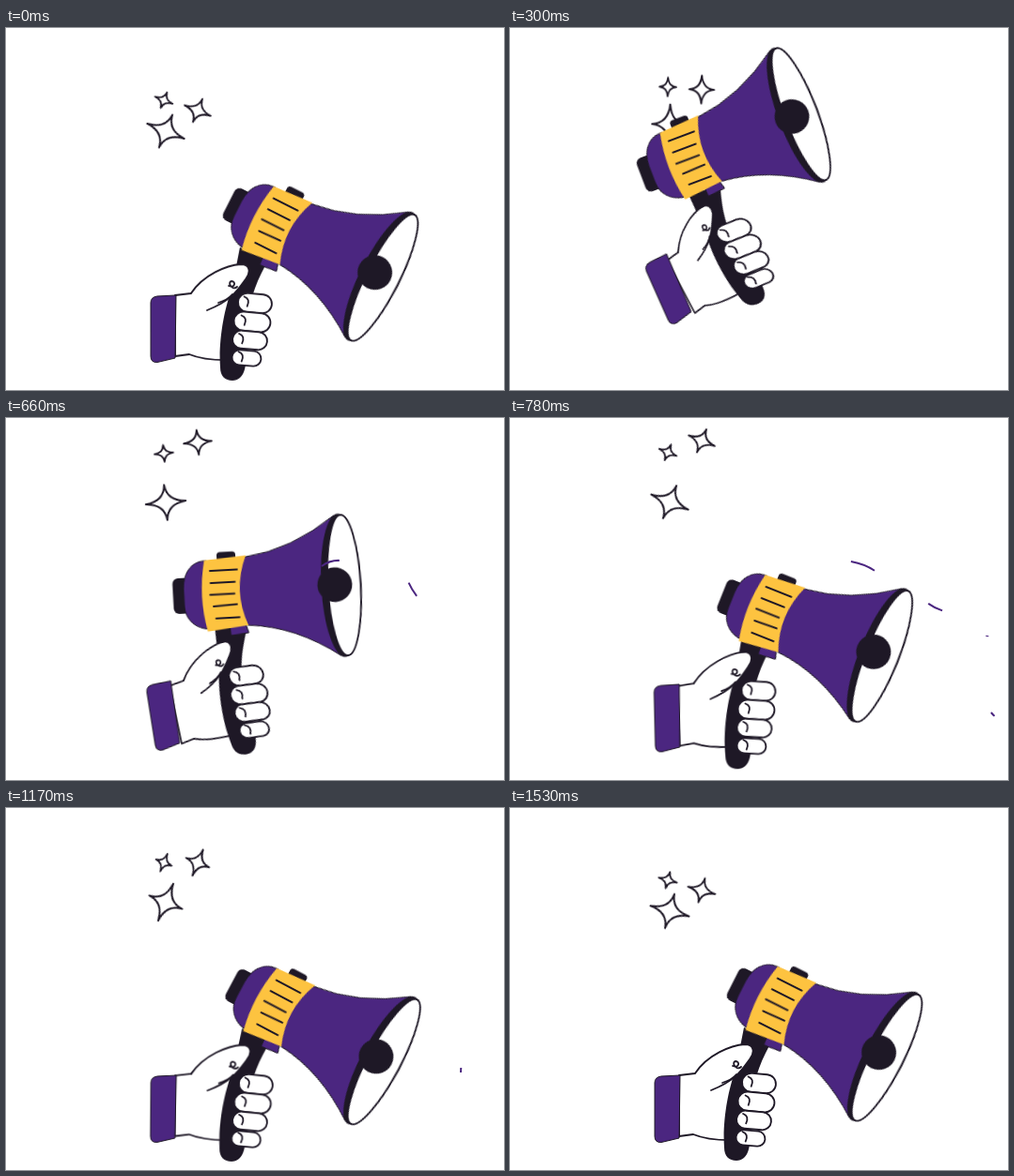
Recreate the animation shown at these times as an HTML page without scripts. Size 530 by 386 pixels, loop 1.56 s.

```html
<!DOCTYPE html>
<html lang="en">
<head>
<meta charset="utf-8">
<title>Megaphone</title>
<style>
  :root {
    --ink: #1e1826;
    --purple: #4b2680;
    --yellow: #fdc340;
    --swing: cubic-bezier(.4, 0, .6, 1);
    --in: cubic-bezier(.4, 0, .8, .7);
    --out: cubic-bezier(.2, .6, .5, 1);
    --settle: cubic-bezier(.35, 0, .6, 1);
  }
  html, body { margin: 0; width: 100%; height: 100%; overflow: hidden; background: #fff; }
  svg { display: block; width: 530px; height: 386px; }

  .line { fill: none; stroke: var(--ink); stroke-width: 1.8; stroke-linecap: round; stroke-linejoin: round; }
  .skin { fill: #fff; stroke: var(--ink); stroke-width: 1.8; stroke-linecap: round; stroke-linejoin: round; }
  .ink { fill: var(--ink); }
  .purple { fill: var(--purple); stroke: var(--ink); stroke-width: 1; }

  .horn, .cuff, .palm, .grip, .lift, .spin, .dart { animation: 1560ms linear infinite; }
  .horn { animation-name: horn; }
  .cuff { animation-name: cuff; transform-origin: 167px 320px; }
  .palm { animation-name: palm; transform-origin: 197px 283px; }
  .grip { animation-name: grip; transform-origin: 261px 323px; }
  .lift { animation-name: lift; }
  .spin { animation-name: spin; fill: none; stroke: var(--ink); stroke-linejoin: round; }
  .dart {
    animation-name: dart;
    animation-delay: calc(var(--at) - 1560ms);
    fill: none; stroke: var(--purple); stroke-width: 2;
    stroke-dasharray: var(--len) 300;
  }

  @keyframes horn {
    0%, 100% { transform: translate(322.5px, 226.5px) rotate(26.8deg); animation-timing-function: cubic-bezier(.45, 0, .7, .8); }
    19.23% { transform: translate(227.5px, 123px) rotate(-20.7deg); animation-timing-function: var(--out); }
    25% { transform: translate(216px, 124px) rotate(-25.5deg); animation-timing-function: var(--in); }
    34.62% { transform: translate(235px, 154px) rotate(-21deg); }
    42.31% { transform: translate(272px, 183px) rotate(-3.2deg); animation-timing-function: var(--out); }
    59.62% { transform: translate(328.5px, 234.5px) rotate(30.3deg); animation-timing-function: var(--settle); }
  }
  @keyframes cuff {
    0%, 100% { transform: translate(0, 0) rotate(0deg); animation-timing-function: var(--swing); }
    19.23% { transform: translate(1px, -41.5px) rotate(-24deg); animation-timing-function: var(--in); }
    34.62% { transform: translate(1px, -17px) rotate(-17.3deg); }
    42.31% { transform: translate(0, -3px) rotate(-9deg); animation-timing-function: var(--out); }
    59.62% { transform: translate(0, 0) rotate(1.3deg); animation-timing-function: var(--settle); }
  }
  /* The thumb shortens as the wrist bends, so the palm is also sheared. */
  @keyframes palm {
    0%, 100% { transform: matrix(1, 0, 0, 1, 0, 0); animation-timing-function: var(--swing); }
    19.23% { transform: matrix(.749, -.407, .454, .865, -18, -44); animation-timing-function: var(--in); }
    34.62% { transform: matrix(.766, -.309, .347, .898, -13, -18); }
    42.31% { transform: matrix(.894, -.221, .197, .947, -8, -3); animation-timing-function: var(--out); }
    59.62% { transform: matrix(1.036, .009, -.03, .985, 1, 1); animation-timing-function: var(--settle); }
  }
  @keyframes grip {
    0%, 100% { transform: translate(0, 0) rotate(0deg) skewY(0deg); animation-timing-function: var(--swing); }
    19.23% { transform: translate(-9px, -81.5px) rotate(-36deg) skewY(9deg); animation-timing-function: var(--out); }
    25% { transform: translate(-12px, -79px) rotate(-38deg) skewY(10deg); animation-timing-function: var(--in); }
    34.62% { transform: translate(-5px, -47.5px) rotate(-31.5deg) skewY(9deg); }
    42.31% { transform: translate(-.5px, -19.5px) rotate(-17.5deg) skewY(5deg); animation-timing-function: var(--out); }
    59.62% { transform: translate(.5px, 3.5px) rotate(4deg) skewY(-2deg); animation-timing-function: var(--settle); }
  }
  @keyframes lift {
    0%, 100% { transform: translateY(0); animation-timing-function: cubic-bezier(.37, 0, .63, 1); }
    47.8% { transform: translateY(var(--rise)); animation-timing-function: cubic-bezier(.37, 0, .63, 1); }
  }
  @keyframes spin {
    from { transform: rotate(22deg); }
    to { transform: rotate(382deg); }
  }
  @keyframes dart {
    0% { stroke-dashoffset: var(--len); }
    19.23%, 100% { stroke-dashoffset: -100; }
  }
</style>
</head>
<body>
<svg viewBox="0 0 530 386">
  <defs>
    <path id="star" d="M0-18.8Q1.500-1.500 21.3 0Q1.500 1.500 0 18.8Q-1.500 1.500-21.3 0Q-1.500-1.500 0-18.8Z"/>
    <path id="nail" class="line" d="M-12-6Q-5-4-8 4"/>
  </defs>

  <g transform="translate(168 77)"><g class="lift" style="--rise:-40.5px"><g class="spin"><use href="#star" transform="scale(.47)" stroke-width="4"/></g></g></g>
  <g transform="translate(204 88)"><g class="lift" style="--rise:-64px"><g class="spin"><use href="#star" transform="scale(.7)" stroke-width="2.700"/></g></g></g>
  <g transform="translate(170 110)"><g class="lift" style="--rise:-20.5px"><g class="spin"><use href="#star" stroke-width="1.900"/></g></g></g>

  <path class="palm skin" d="M180 285L197 283C215 262 235 255 248 254L242 300L241 354Q212 355 195 348L180 350Z"/>

  <path class="grip ink" d="M249 234L280 246C268 268 260 285 258 310C256 335 258 350 254 364C252 372 247 376 241 376C233 376 228 371 228 362C226 335 232 300 240 280Z"/>

  <g class="horn">
    <rect class="ink" x="-94.500" y="-17" width="19" height="38" rx="6"/>
    <rect class="ink" x="-46" y="-42.500" width="20" height="12" rx="3.500"/>
    <path class="purple" d="M-36 37L-19 35L-16 45L-35 47Z"/>
    <path class="purple" d="M-57-34C-72-35-82-24-83-6V12C-83 28-72 38-57 39Z"/>
    <path class="purple" d="M-40-30L-15-36Q34-41 81-75V75Q34 41-16 37L-40 32Z"/>
    <path fill="var(--yellow)" d="M-59.500-34.500L-15-37.500Q-31 0-16 37L-59.500 41.500Q-68 4-59.500-34.500Z"/>
    <path class="line" d="M-54-23h29M-54-10h26M-55 2.500h26M-52 15l25-1M-50 28h25"/>
    <ellipse class="ink" cx="85" rx="21.500" ry="76.500"/>
    <ellipse class="skin" cx="88" rx="17.500" ry="75"/>
    <circle class="ink" cx="78" cy="-1" r="18.500"/>
  </g>

  <g class="palm">
    <path class="skin" d="M197 283C210 263 235 253 250 252C261 252 260 262 255 268C247 279 240 291 214 301"/>
    <path class="line" d="M246 276C241 281 235 271 240 270C245 270 244 278 237 275M241 284Q236 290 226 293"/>
  </g>

  <g class="grip">
    <g transform="translate(265 293.5) rotate(5)"><rect class="skin" x="-18" y="-10" width="36" height="20" rx="10"/><use href="#nail"/></g>
    <g transform="translate(262 313.5) rotate(5)"><rect class="skin" x="-19.500" y="-10" width="39" height="20" rx="10"/><use href="#nail"/></g>
    <g transform="translate(259.5 333) rotate(5)"><rect class="skin" x="-18.500" y="-9.500" width="37" height="19" rx="9.500"/><use href="#nail"/></g>
    <g transform="translate(256 352) rotate(5)"><rect class="skin" x="-15.500" y="-8" width="31" height="16" rx="8"/><use href="#nail" x="3"/></g>
  </g>

  <path class="cuff purple" d="M161 286L181 285L180 352L161 356.500Q154 357 154 350V293Q154 287 161 286Z"/>

  <path class="dart" pathLength="100" style="--at:592ms;--len:45" d="M336 158Q345 151 357 152Q380 155 392 166"/>
  <path class="dart" pathLength="100" style="--at:560ms;--len:31" d="M426 169Q430 181 438 191Q446 201 462 206"/>
  <path class="dart" pathLength="100" style="--at:798ms;--len:59" d="M402 326L403 314C404 288 432 278 447 301Q456 314 474 318"/>
  <path class="dart" pathLength="100" style="--at:772ms;--len:27;stroke-width:3" d="M508 232L505 262"/>
  <path class="dart" pathLength="100" style="--at:746ms;--len:60" d="M512 314Q522 326 536 327"/>
  <path class="dart" pathLength="100" style="--at:924ms;--len:40" d="M485 262L484 282"/>
</svg>
</body>
</html>
```
